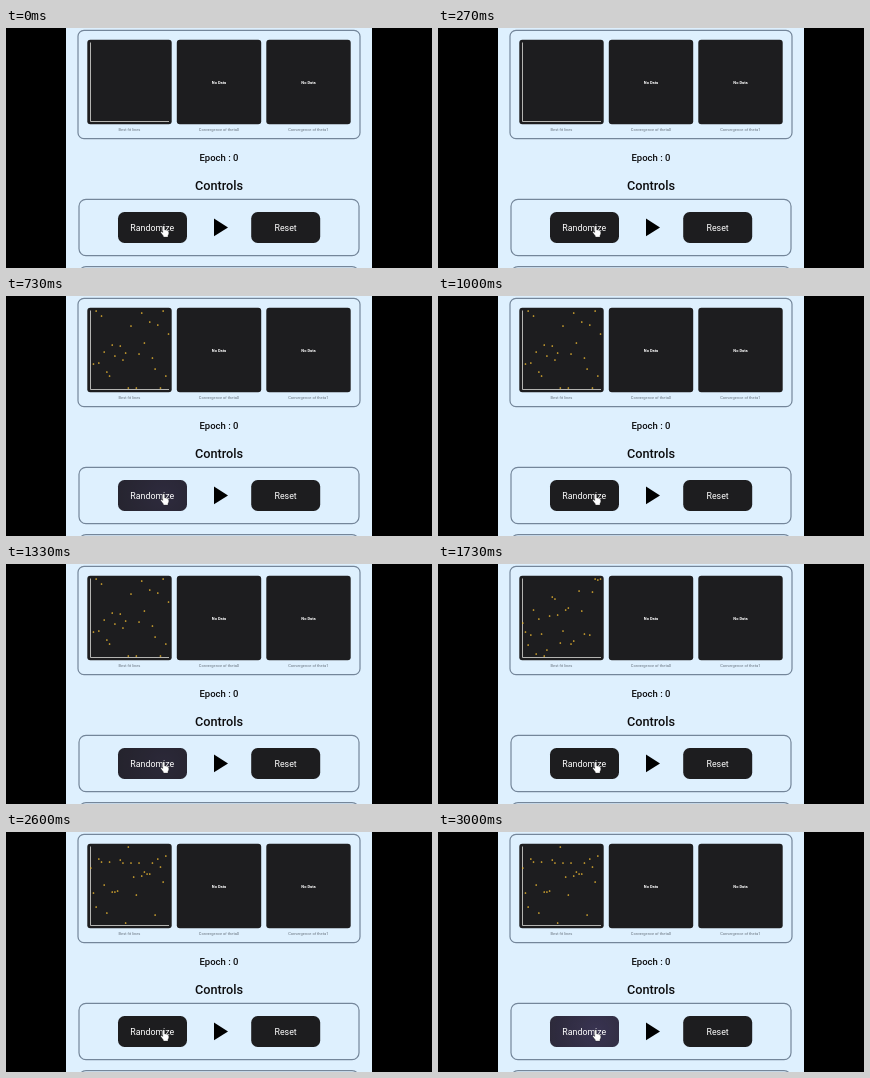
An HTML page that plays this animation: 426 px wide and 240 px high, repeating every 3070 ms.

```html
<!DOCTYPE html>
<html lang="en">
<head>
<meta charset="utf-8">
<title>Regression controls</title>
<style>
  html, body { margin: 0; width: 100%; height: 100%; overflow: hidden; background: #000; }
  svg { display: block; width: 100vw; height: 100vh; font-family: Roboto, Arial, sans-serif; }
  text { text-anchor: middle; }
  .frame { fill: none; stroke: #74869a; stroke-width: 1.2; }
  .dark { fill: #1d1d1f; }
  .caption { font-size: 4px; fill: #66717d; }
  .empty { font-size: 4px; font-weight: 700; fill: #fff; }
  .label { font-size: 8.8px; fill: #fff; }
  .heading { font-weight: 500; fill: #0c0c0e; }
  .dots { fill: #e6b432; visibility: hidden; animation: 3.07s step-end infinite; }
  #first { animation-name: first; }
  #second { animation-name: second; }
  #third { animation-name: third; }
  #press { opacity: 0; animation: press 3.07s linear infinite; }
  /* each click scatters a new set of points */
  @keyframes first {
    0% { visibility: hidden; }
    19.54% { visibility: visible; }
    45.6%, 100% { visibility: hidden; }
  }
  @keyframes second {
    0% { visibility: hidden; }
    45.6% { visibility: visible; }
    71.6%, 100% { visibility: hidden; }
  }
  @keyframes third {
    0% { visibility: hidden; }
    71.6%, 100% { visibility: visible; }
  }
  @keyframes press {
    0%, 14.6% { opacity: 0; }
    19.5% { opacity: 1; }
    30.5%, 41% { opacity: 0; }
    45.6% { opacity: 1; }
    56%, 66% { opacity: 0; }
    70.5% { opacity: 1; }
    82%, 93% { opacity: 0; }
    97.5%, 100% { opacity: 1; }
  }
</style>
</head>
<body>
<svg viewBox="0 0 426 240">
  <defs>
    <radialGradient id="glow" gradientUnits="userSpaceOnUse" cx="158" cy="199" r="48">
      <stop offset="0" stop-color="#685aa6" stop-opacity=".38"/>
      <stop offset="1" stop-color="#5a4f8a" stop-opacity=".26"/>
    </radialGradient>
  </defs>

  <rect x="60" width="306" height="240" fill="#def0fe"/>
  <rect class="frame" x="72" y="2.3" width="282" height="108.4" rx="6"/>
  <rect class="frame" x="73" y="171.3" width="280" height="56.4" rx="7"/>
  <rect class="frame" x="73" y="238.6" width="280" height="40" rx="7"/>

  <g class="dark">
    <rect x="81.3" y="11.8" width="84.4" height="84.4" rx="3"/>
    <rect x="170.8" y="11.8" width="84.4" height="84.4" rx="3"/>
    <rect x="260.3" y="11.8" width="84.4" height="84.4" rx="3"/>
    <rect x="112" y="184" width="69" height="31" rx="6.5"/>
    <rect x="245.2" y="184" width="69" height="31" rx="6.5"/>
  </g>
  <path d="M84.5 14.5V93.5H163" fill="none" stroke="#c6c6c2" stroke-width=".9"/>
  <g id="first" class="dots"></g>
  <g id="second" class="dots"></g>
  <g id="third" class="dots"></g>

  <text class="empty" x="213" y="55.6">No Data</text>
  <text class="empty" x="302.5" y="55.6">No Data</text>
  <text class="caption" x="123.5" y="103">Best fit lines</text>
  <text class="caption" x="213" y="103">Convergence of theta0</text>
  <text class="caption" x="302.3" y="103">Convergence of theta1</text>

  <text class="heading" x="213" y="133.4" font-size="9.5">Epoch : 0</text>
  <text class="heading" x="213" y="161.6" font-size="12.7">Controls</text>

  <rect id="press" x="112" y="184" width="69" height="31" rx="6.5" fill="url(#glow)"/>
  <text class="label" x="146.3" y="202.6">Randomize</text>
  <text class="label" x="279.6" y="202.6">Reset</text>
  <path d="M208 190.6L222 199.4L208 208.2Z"/>

  <path d="M156.7 198.2q1.1-1 1.9.1v3.6l1.2.1 1.2.4 1 .5.8.8v2.2l-.8 1.6v1.6h-4.5l-.3-1.3-2.5-3.4q.2-1.2 1.2-.7l.8.8Z"
    fill="#fff" stroke="#222" stroke-width=".35" stroke-linejoin="round"/>
</svg>
<script>
  // heights of evenly spaced points; 0 marks a gap
  const sets = {
    first: [0, 68, 15, 67, 20, 56, 76, 80, 49, 60, 0, 50, 64, 57, 92,
      30, 0, 92, 58, 17, 47, 0, 26, 62, 73, 29, 92, 15, 80, 38],
    second: [59, 68, 81, 71, 46, 90, 55, 70, 92, 86, 52, 33, 35, 51, 79,
      67, 46, 44, 80, 77, 0, 27, 47, 70, 0, 71, 28, 15, 16, 15],
    third: [36, 61, 75, 27, 30, 53, 81, 30, 60, 60, 59, 28, 31, 91, 15,
      31, 45, 63, 31, 44, 40, 42, 42, 31, 83, 27, 35, 50, 24, 0]
  };
  for (const [id, heights] of Object.entries(sets)) {
    const group = document.getElementById(id);
    heights.forEach((y, i) => {
      if (!y) return;
      const dot = document.createElementNS(group.namespaceURI, "circle");
      dot.setAttribute("cx", 84.8 + 2.68 * i);
      dot.setAttribute("cy", y);
      dot.setAttribute("r", 0.85);
      group.append(dot);
    });
  }
</script>
</body>
</html>
```
